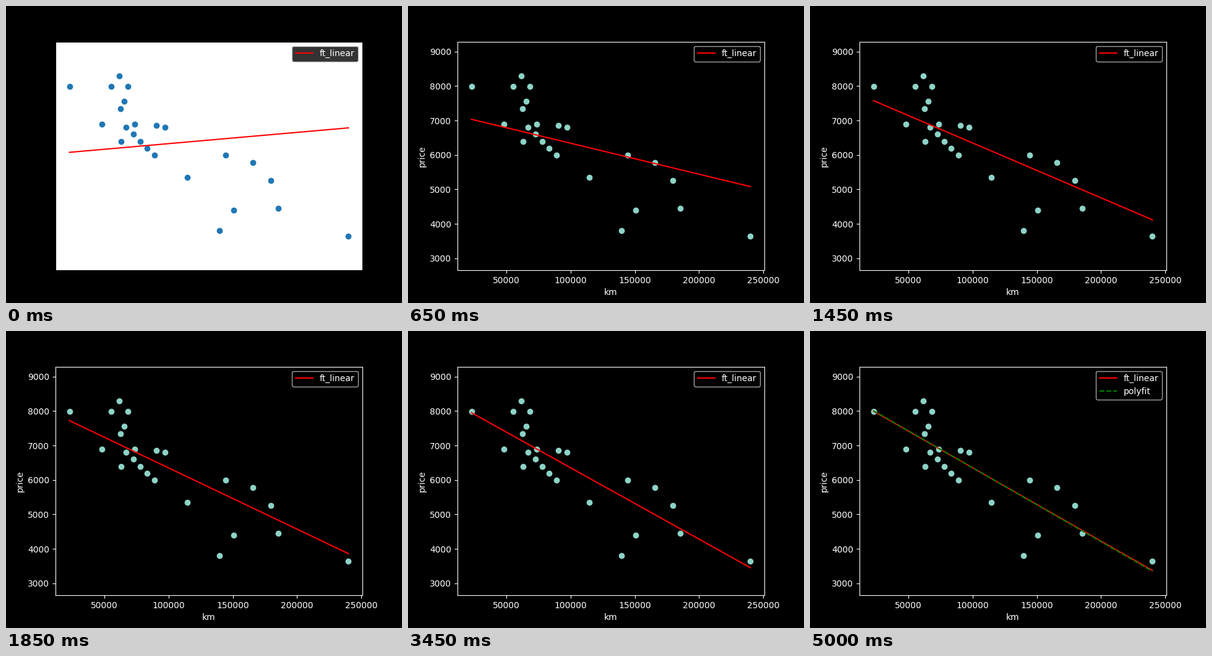
A matplotlib script that plays this animation: 640 by 480 pixels, repeating every 5050 ms.

```python
import numpy as np
import matplotlib.pyplot as plt
from matplotlib.animation import FuncAnimation

FRAMES = 101
INTERVAL = 50

SLOPE = -0.02145           # best fit, price per km
PIVOT = 101066, 6331.8     # the fit turns about this point
DECAY = 0.9503             # share of the slope error left after each step
FIRST_GAP = 0.02472        # slope error of the opening guess
GAP = 0.02415              # slope error scale once the descent is running


def row(count, start, end, bow=1.0):
    """Dots from start to end; bow > 1 bends the row up and to the right."""
    t = np.linspace(0, 1, count)
    x = start[0] + (end[0] - start[0]) * (1 - (1 - t) ** bow)
    y = start[1] + (end[1] - start[1]) * t ** bow
    return 1000 * np.column_stack([x, y])


def predict(gap):
    return PIVOT[1] + (SLOPE + gap) * (ends - PIVOT[0])


# thousands of km, thousands in price
km, price = np.vstack([
    row(3, (22.9, 7.99), (68.5, 7.99), 1.8),
    row(4, (48.2, 6.9), (97.5, 6.8), 1.8),
    row(4, (144.5, 6.0), (185.5, 4.45), 1.8),
    row(5, (67, 6.8), (89, 5.99)),
    row(3, (61.8, 8.29), (63, 6.39)),
    row(2, (65.7, 7.56), (114.8, 5.35)),
    row(2, (139.8, 3.8), (150.5, 4.4)),
    row(1, (240, 3.65), (240, 3.65)),
]).T
ends = np.array([km.min(), km.max()])
pad = 0.05 * np.ptp(km)

plt.style.use("dark_background")
fig, ax = plt.subplots(figsize=(6.4, 4.8), dpi=100)
ax.set_xlim(ends[0] - pad, ends[1] + pad)
ax.set_ylim(price.min() - 1000, price.max() + 1000)
ax.set_xlabel("km")
ax.set_ylabel("price")

dots = ax.scatter(km, price)
fit, = ax.plot(ends, predict(FIRST_GAP), color="red", label="ft_linear")
best, = ax.plot(ends, predict(0), color="green", linestyle="--", label="polyfit")

short_key = ax.legend(handles=[fit], loc="upper right")
ax.add_artist(short_key)
full_key = ax.legend(handles=[fit, best], loc="upper right")


def set_theme(light):
    ax.set_facecolor("white" if light else "black")
    dots.set_color("#1f77b4" if light else "#8dd3c7")
    for spine in ax.spines.values():
        spine.set_edgecolor("black" if light else "white")
    for axis in (ax.xaxis, ax.yaxis):
        axis.set_visible(not light)


def draw(n):
    last = n == FRAMES - 1
    set_theme(n == 0)
    fit.set_ydata(predict(GAP * DECAY ** n if n else FIRST_GAP))
    best.set_visible(last)
    full_key.set_visible(last)
    short_key.set_visible(not last)
    return fit, best


anim = FuncAnimation(fig, draw, frames=FRAMES, interval=INTERVAL,
                     repeat=True, repeat_delay=0, blit=False)
plt.show()
```
